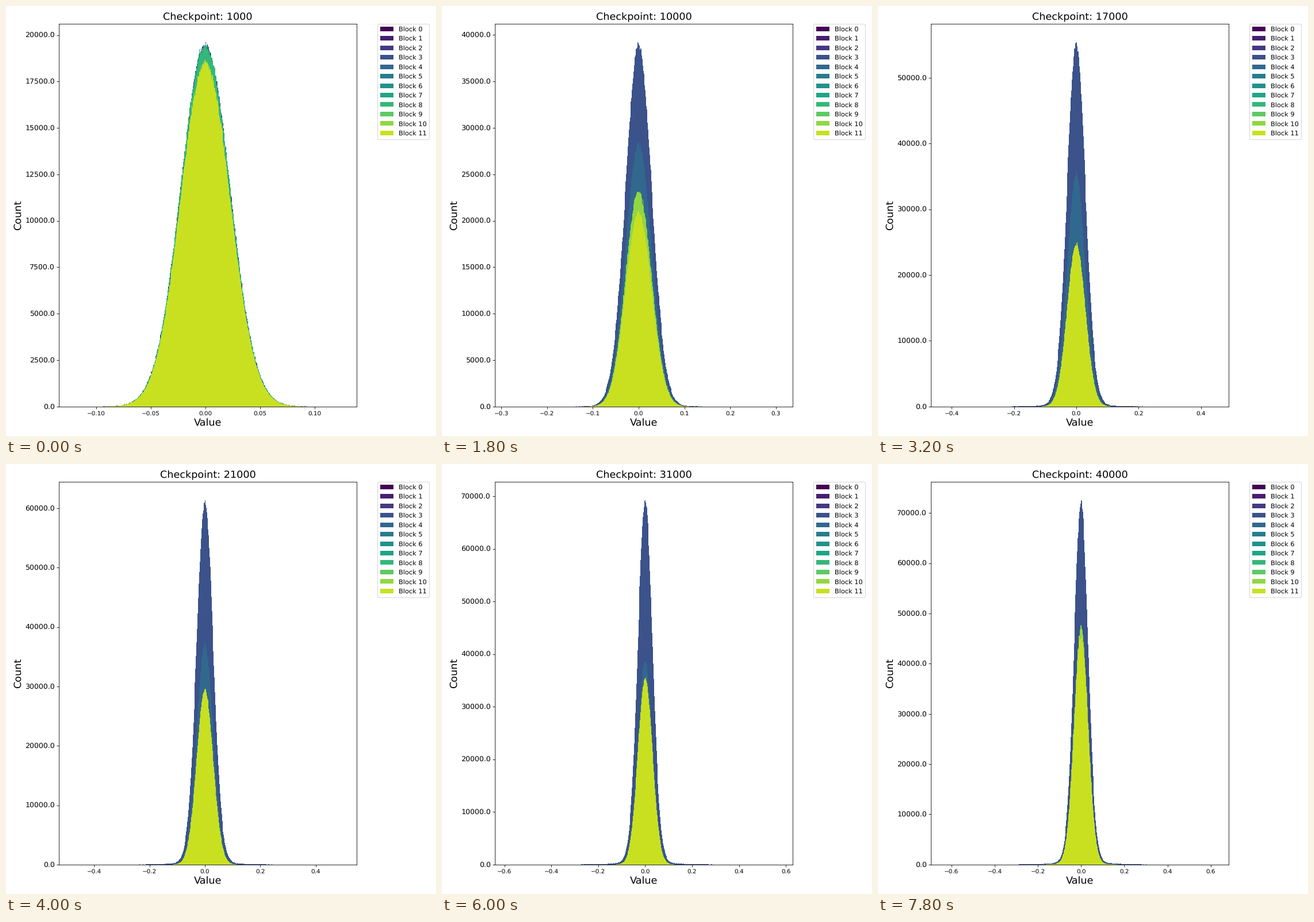
A matplotlib script for the animation above (8 s loop, 748 by 748 pixels).

```python
import numpy as np
import matplotlib.pyplot as plt
from matplotlib.animation import FuncAnimation
from matplotlib.patches import Patch

SIZE = 748
FRAMES = 40
BLOCKS = 12
BINS = 500
WEIGHTS = 2359296  # values per histogram
ONSET = 5.6        # checkpoint (in thousands) where blocks 3 and 4 take off

plt.rcParams["text.hinting"] = "none"
colors = [plt.cm.viridis(k / BLOCKS) for k in range(BLOCKS)]


def px(left, bottom, right, top):
    return [left / SIZE, bottom / SIZE, (right - left) / SIZE, (top - bottom) / SIZE]


def early(t):
    """Fades from 1 at the first checkpoint to 0."""
    return np.exp(-(t - 1) / 1.5)


def takeoff(t, start, end, rate):
    """Short ramp to the start value, then saturating growth."""
    if t < ONSET:
        return np.interp(t, [1, ONSET], [19000, start])
    return end - (end - start) * np.exp(-rate * (t - ONSET))


def peak(k, t):
    """Mean height of a block's histogram at its centre."""
    if k == 3:
        return takeoff(t, 22100, 74700, .0885)
    if k == 4:
        return takeoff(t, 18000, 39300, .15)
    if k == 10:
        return np.interp(t, [1, 6, 14, 31, 40], [18400, 24200, 22300, 33000, 47400])
    front = np.interp(t, [1, 6, 14, 21, 31, 40],
                      [18500, 20500, 21200, 29500, 35500, 45300])
    if k == 11:
        return front
    return front * (.95 + (.095 * early(t) if k != 9 else 0))


def bin_width(height, t):
    spread = .0271 + .00014 * t - .0031 * early(t)
    return height * np.sqrt(2 * np.pi) * spread / WEIGHTS


def histogram(height, t, rng):
    """Noisy bell with faint long tails; a wider bin range means taller bars."""
    width = bin_width(height, t)
    half = width * BINS / 2
    edges = (np.arange(BINS + 1) - BINS / 2 + rng.uniform(-1, 1)) * width
    x = (edges[1:] + edges[:-1]) / 2
    sigma = .0271 + .00014 * t - .0046 * early(t)
    tail = .022 * min(1, (half / .35) ** 2)
    bell = (1 - tail) * np.exp(-x ** 2 / (2 * sigma ** 2))
    bell += tail * np.exp(-np.abs(x) / (.12 * half))
    return rng.poisson(height * bell), edges


fig = plt.figure(figsize=(10, 10), dpi=SIZE / 10, facecolor="white")
ax = fig.add_axes(px(92.2, 51.2, 610.2, 717.2))
ax.set_xlabel("Value", fontsize=17)
ax.set_ylabel("Count", fontsize=17)
ax.tick_params(axis="x", labelsize=10)
ax.tick_params(axis="y", labelsize=12)
ax.yaxis.set_major_formatter("{x:.1f}")
title = ax.set_title("", fontsize=17)
ax.legend(handles=[Patch(color=c, lw=0, label=f"Block {k}") for k, c in enumerate(colors)],
          loc="upper left", bbox_to_anchor=(1.07, 1), borderaxespad=0,
          fontsize=11, labelspacing=.51)

steps = []
for k, color in enumerate(colors):
    step = ax.stairs(np.zeros(BINS), np.arange(BINS + 1), fill=True,
                     facecolor=color, edgecolor="none", lw=0, zorder=1 + k / 100)
    step.set_snap(True)
    steps.append(step)


def draw(i):
    t = i + 1
    rng = np.random.default_rng(100 + i)
    title.set_text(f"Checkpoint: {t * 1000}")

    heights = [peak(k, t) for k in range(BLOCKS)]
    top = 0
    for step, height in zip(steps, heights):
        counts, edges = histogram(height, t, rng)
        step.set_data(counts, edges)
        top = max(top, counts.max())

    # The outermost values lean right at first and left later on.
    lean = (.003 - .0086 * np.tanh((t - 24) / 2)) * (1 - .8 * early(t))
    reach = 1.1 * bin_width(max(heights), t) * BINS / 2
    ax.set_xlim(lean - reach, lean + reach)
    ax.set_ylim(0, 1.05 * top)
    return steps


anim = FuncAnimation(fig, draw, frames=FRAMES, init_func=lambda: draw(0),
                     interval=200, repeat=True, repeat_delay=0, blit=False)
plt.show()
```
